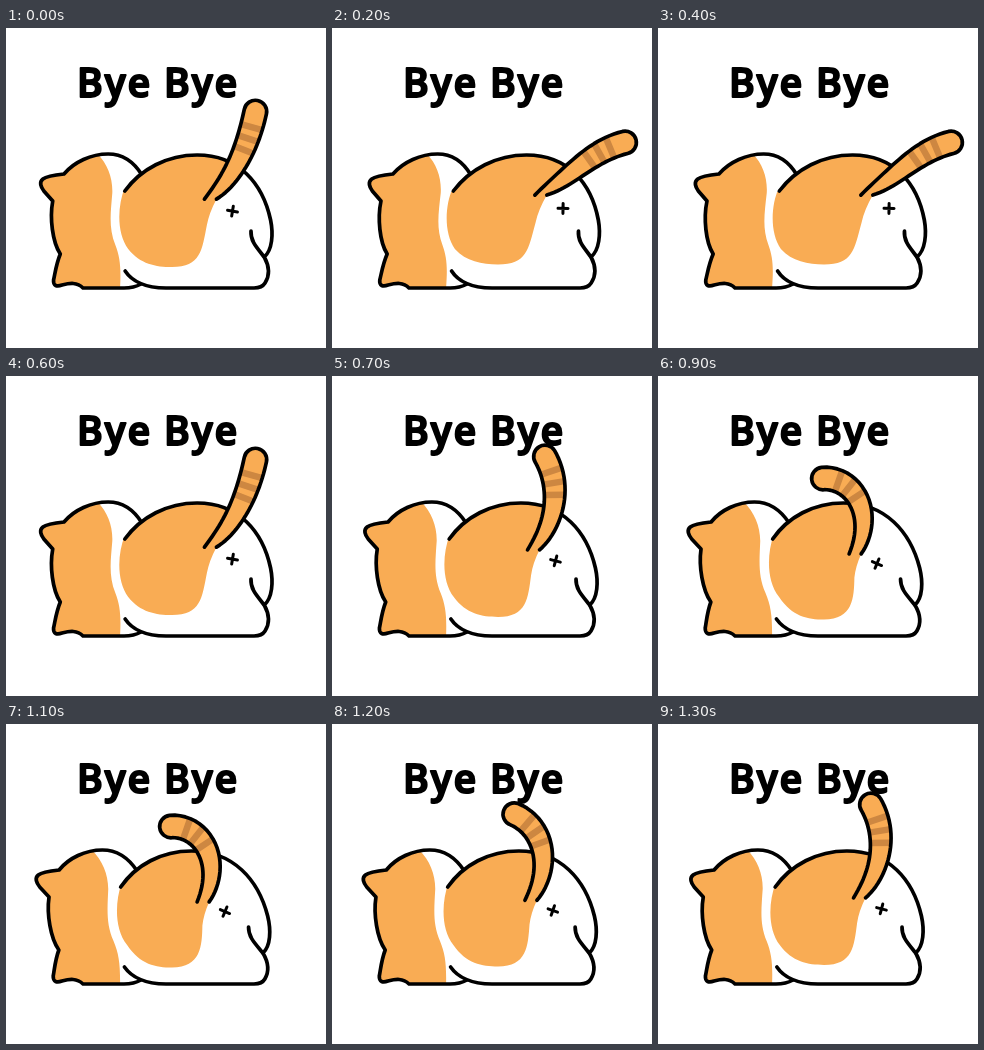
These frames come from a looping animation (320x320 px, 1400 ms). An HTML page:

```html
<!DOCTYPE html>
<html lang="en">
<head>
<meta charset="utf-8">
<title>Bye Bye</title>
<style>
  html, body { margin: 0; width: 100%; height: 100%; overflow: hidden; background: #fff; }
  svg { display: block; width: 100%; height: 100%; }
  .line { fill: none; stroke: #000; stroke-width: 3.7; stroke-linecap: round; stroke-linejoin: round; }
  .white { fill: #fff; }
  .fur { fill: #f9ac54; }
  .stripe { fill: none; stroke: #cd8741; stroke-width: 6.5; }
  #mark { stroke-width: 3; }
  text {
    font: 600 39px "Open Sans", "Noto Sans", sans-serif;
    letter-spacing: 2px;
    stroke: #000; stroke-width: 2; stroke-linejoin: round;
  }
</style>
</head>
<body>
<svg viewBox="0 0 320 320">
  <defs>
    <path id="head" d="M135 147C125 131 112 126 101 126C84 126 67 134 57 146
      C48 147 40 148 36 151C32 154 34 159 37 163L46 173C43 190 46 214 54 226
      C50 236 49 245 47.500 252C47 258 51 259 56 257C64 255 71 254 77 260H118Q128 260 135 256"/>
    <path id="body" d="M118 163C134 141 160 127 190 127C232 127 256 156 264 192
      C267 206 266 222 258 229C263 238 264 247 259 255Q256 260 248 260H160
      C138 260 125 252 119 243"/>
    <clipPath id="headClip"><use href="#head"/></clipPath>
    <clipPath id="bodyClip">
      <use href="#body" class="lean"/>
      <rect x="100" y="164" width="30" height="78"/>
    </clipPath>
  </defs>

  <text x="71" y="68.500">Bye</text>
  <text x="158" y="68.500">Bye</text>

  <g class="lean">
    <use href="#head" class="white"/>
    <path class="fur" clip-path="url(#headClip)"
      d="M20 120H83C98 130 106 147 105.500 165C104 185 102 200 109 217C114 230 115 240 114 262H20Z"/>
    <use href="#head" class="line"/>
    <use href="#body" class="white"/>
  </g>
  <g clip-path="url(#bodyClip)"><path id="patch" class="fur"/></g>
  <g class="lean line">
    <use href="#body"/>
    <path d="M244.500 203C244 213 250 219 258 229"/>
  </g>
  <path id="mark" class="line" d="M-5 0H5M0 -5V5"/>

  <path id="tailFill" class="fur"/>
  <path id="stripes" class="stripe"/>
  <path id="tailLine" class="line"/>
</svg>
<script>
  const STEP = 100, STEPS = 14;
  const TAIL = 100, PARTS = 25, BANDS = [15, 18, 21];
  const RAD = Math.PI / 180;
  const $ = id => document.getElementById(id);
  const set = (id, name, value) => $(id).setAttribute(name, value);
  const leaning = document.querySelectorAll('.lean');

  // A tapered tail whose heading turns from base to tip; s is the swing, -1 to 1.
  function tailEdges(s) {
    const mean = 74 - 47 * s, curl = 26 - 40 * s;
    const left = [], right = [];
    let x = 203 + 6.5 * s, y = 172.5 - 6 * s;
    for (let i = 0; i <= PARTS; i++) {
      const t = i / PARTS;
      const turn = mean + 2 * curl * (t - 0.5) + 15 * s * (Math.sin(Math.PI * t) - 0.64);
      const side = (90 + turn + (90 - turn) * (1 - t) ** 4) * RAD;   // level cut at the base
      const r = 6 + 5.3 * Math.sin(Math.PI * t / 2);
      const dx = r * Math.cos(side), dy = -r * Math.sin(side);
      left.push(`${x + dx} ${y + dy}`);
      right.push(`${x - dx} ${y - dy}`);
      x += TAIL / PARTS * Math.cos(turn * RAD);
      y -= TAIL / PARTS * Math.sin(turn * RAD);
    }
    return { left, right };
  }

  function draw(s) {
    const k = 0.038 * s;
    leaning.forEach(el => el.setAttribute('transform', `matrix(1 0 ${-k} 1 ${k * 260} 0)`));
    set('mark', 'transform', `translate(${225 + 6.7 * s} ${184 - 4 * s}) rotate(${12 - 12 * s})`);

    const { left, right } = tailEdges(s);
    const tail = `M${left.join('L')}A11.300 11.300 0 0 1 ${[...right].reverse().join('L')}`
      .replace(/(A\S+ \S+ 0 0 1 [^L]+)/, '$1');
    set('tailFill', 'd', tail + 'Z');
    set('tailLine', 'd', tail);
    set('stripes', 'd', BANDS.map(i => `M${left[i]}L${right[i]}`).join(''));

    // The back patch ends under the tail's right edge.
    const low = 240 - 4 * s;
    set('patch', 'd', `M100 112L${118 + 3 * s} 160C${111 + 2 * s} 178 ${110 + 2 * s} 205 ${122 + s} 221
      C134 ${low - 3} 150 ${low} 166 ${low}C195 ${low} 196 222 ${200 + 4 * s} ${198 - 4 * s}
      Q${202 + 5 * s} ${186 - 5 * s} ${right.join('L')}Z`);
  }

  let last = -1;
  function tick() {
    const n = Math.floor(performance.now() / STEP) % STEPS;
    if (n !== last) draw(Math.sin(2 * Math.PI * (n + 0.5) / STEPS));
    last = n;
    requestAnimationFrame(tick);
  }
  tick();
</script>
</body>
</html>
```
